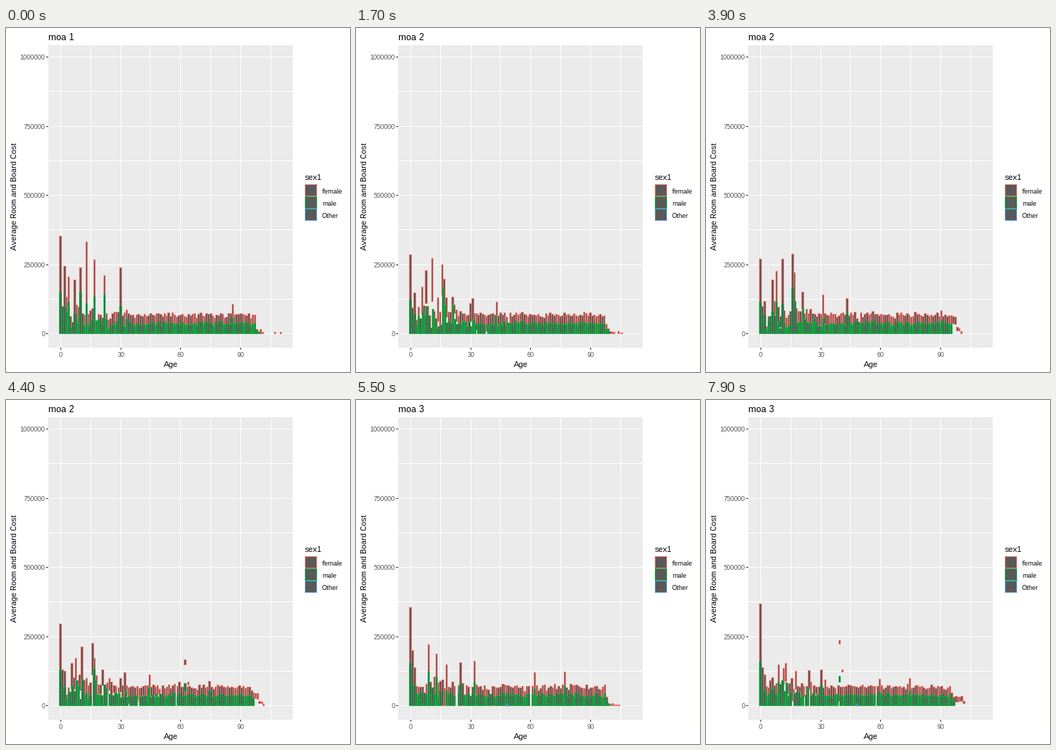
A matplotlib script for the animation above (8000 ms loop, 480x480 px).

```python
import numpy as np
import matplotlib.pyplot as plt
from matplotlib.animation import FuncAnimation
from matplotlib.collections import PolyCollection
from matplotlib.patches import Rectangle

plt.rcParams.update({
    "font.family": "Liberation Sans",
    "text.hinting": "native",
    "text.hinting_factor": 1,
})

SIZE, DPI = 480, 72
STEP, FRAMES = 100, 80
X0, DX = 75.7, 2.795          # pixel of age 0, pixels per year
Y0, DY = 426.3, 0.3863        # pixel of zero cost, pixels per thousand
LEFT, TOP, RIGHT, BOTTOM = 59, 24, 400, 446
RED, GREEN, BLUE, FILL = "#F8766D", "#00BA38", "#619CFF", "#595959"
MOVE = 17                     # steps in one transition
STARTS = (5, 39, 73)          # first moving step of each transition
WRAPPED = 2                   # state whose first bars swap with the oldest ages


def make_state(seed, last, gaps, peaks, late=()):
    """Stacked bars per sex as rows of (age, low, high), in thousands."""
    rng = np.random.default_rng(seed)
    ages = np.r_[np.arange(last + 1), np.array(late, int)]
    n = len(ages)
    total = 68 + rng.normal(0, 6, n)
    total += np.exp(-ages / 15) * rng.uniform(-45, 90, n)
    for age, top in peaks.items():
        total[age] = top
    tail = ages > 97
    total[tail] = rng.uniform(0.3, 1, tail.sum()) * np.maximum(8, 40 - 8 * (ages[tail] - 97))
    spread = np.where(ages < 35, 0.22, 0.09)
    male = total * (0.53 + spread * rng.uniform(-1, 1, n))
    male[0] = 0.43 * total[0]

    # Ages with no row shift all later rows of that sex.
    plain = [a for a in range(3, 61) if a not in peaks]
    no_female = rng.choice(plain, gaps, replace=False)
    no_male = rng.choice(plain, gaps, replace=False)
    has_male = (ages < 100) & ~np.isin(ages, no_male)
    male[~has_male] = 0
    rows_f = np.stack([ages, male, total], 1)[~np.isin(ages, no_female)]
    rows_m = np.stack([ages, 0 * male, male], 1)[has_male]
    return rows_f, rows_m


STATES = [
    make_state(1, 101, 1, {0: 352, 2: 245, 4: 205, 7: 195, 10: 240, 13: 333,
                           17: 268, 22: 210, 30: 238, 86: 107}, (107, 110)),
    make_state(2, 104, 2, {0: 264, 6: 202, 8: 238, 11: 282, 16: 299, 17: 230,
                           21: 155, 31: 146, 43: 132}),
    make_state(3, 104, 6, {0: 355, 1: 200, 9: 220, 13: 188, 18: 148, 25: 157,
                           32: 162, 62: 121, 77: 123}),
    make_state(4, 101, 0, {0: 387, 6: 150, 11: 180, 30: 130, 52: 103}),
]


def strays(rows, other, count):
    """Thin caps of the first bars, paired with the other state's oldest bars."""
    caps = rows[:count].copy()
    caps[:, 1] = caps[:, 2] - 6
    old = other[np.isin(other[:, 0], (96, 98))][:count]
    return caps, old


def blend(k, sex, p):
    a, b = STATES[k][sex], STATES[k + 1][sex]
    n = min(len(a), len(b))
    count = 2 - sex
    if k == WRAPPED:
        start, end = strays(a, b, count)
    elif k + 1 == WRAPPED:
        end, start = strays(b, a, count)
    else:
        start = end = np.empty((0, 3))
    return np.vstack([a[:n], start]) * (1 - p) + np.vstack([b[:n], end]) * p


def rows_at(i):
    """Female, male and other rows at step i, and the number in the title."""
    k, p = 0, 0.0
    for j, start in enumerate(STARTS):
        if i >= start:
            k, p = j, min((i - start + 1) / MOVE, 1)
    label = k + 1 + (p > 0.5)
    other = np.array([(48, 0, 9)] if k + p >= WRAPPED else [])
    if p in (0, 1):
        female, male = STATES[k + int(p)]
    else:
        female, male = blend(k, 0, p), blend(k, 1, p)
    return (female, male, other), label


def px(v):
    """Centre of the nearest pixel."""
    return np.floor(np.asarray(v) + 0.5) + 0.5


def boxes(rows):
    """Pixel-aligned corner points of the bars."""
    if len(rows) == 0:
        return []
    age, low, high = rows.T
    mid = X0 + DX * age
    l, r = px(mid - 0.45 * DX), px(mid + 0.45 * DX)
    b, t = px(Y0 - DY * low), px(Y0 - DY * high)
    return np.stack([np.stack(c, 1) for c in ((l, b), (l, t), (r, t), (r, b))], 1)


fig = plt.figure(figsize=(SIZE / DPI, SIZE / DPI), dpi=DPI, facecolor="white")
ax = fig.add_axes([0, 0, 1, 1])
ax.set_xlim(0, SIZE)
ax.set_ylim(SIZE, 0)
ax.axis("off")


def rule(xs, ys, color):
    ax.plot(xs, ys, color=color, lw=1, antialiased=False, snap=False,
            zorder=1, solid_capstyle="butt")


def write(x, y, text, size, color="black", **kw):
    return ax.text(x, y, text, fontsize=size, color=color, **kw)


ax.add_patch(Rectangle((LEFT, TOP), RIGHT - LEFT, BOTTOM - TOP, fc="#EBEBEB",
                       ec="none", zorder=0))
for age in range(0, 106, 15):
    x = px(X0 + DX * age)
    rule([x, x], [TOP, BOTTOM], "white")
    if age % 30 == 0:
        rule([x, x], [BOTTOM, BOTTOM + 3], "#333333")
        write(x, 459, str(age), 9, "#4D4D4D", ha="center")
for cost in range(0, 1001, 125):
    y = px(Y0 - DY * cost)
    rule([LEFT, RIGHT], [y, y], "white")
    if cost % 250 == 0:
        rule([LEFT - 3, LEFT], [y, y], "#333333")
        write(54.5, y + 3.5, str(cost * 1000), 9, "#4D4D4D", ha="right")

write(230, 473, "Age", 11, ha="center")
write(12, 235, "Average Room and Board Cost", 11, rotation=90, ha="center",
      va="center")
title = write(59, 17, "", 13)

write(417, 212, "sex1", 11)
for n, (name, edge) in enumerate(zip(("female", "male", "Other"),
                                     (RED, GREEN, BLUE))):
    y = np.floor(218 + 17.28 * n) + 0.5
    ax.add_patch(Rectangle((417.5, y), 16, 16, fc=FILL, ec=edge, lw=1,
                           antialiased=False, snap=False))
    write(441, y + 12.5, name, 9)

layers = []
for z, edge in enumerate((RED, GREEN, BLUE)):
    layer = PolyCollection([], facecolors=FILL, edgecolors=edge, linewidths=1,
                           antialiaseds=False, snap=False, zorder=3 + z)
    ax.add_collection(layer, autolim=False)
    layers.append(layer)


def draw(i):
    groups, label = rows_at(i)
    for layer, rows in zip(layers, groups):
        layer.set_verts(boxes(rows))
    title.set_text(f"moa {label}")
    return [*layers, title]


anim = FuncAnimation(fig, draw, frames=FRAMES, interval=STEP, repeat=True,
                     repeat_delay=0, blit=False)
plt.show()
```
